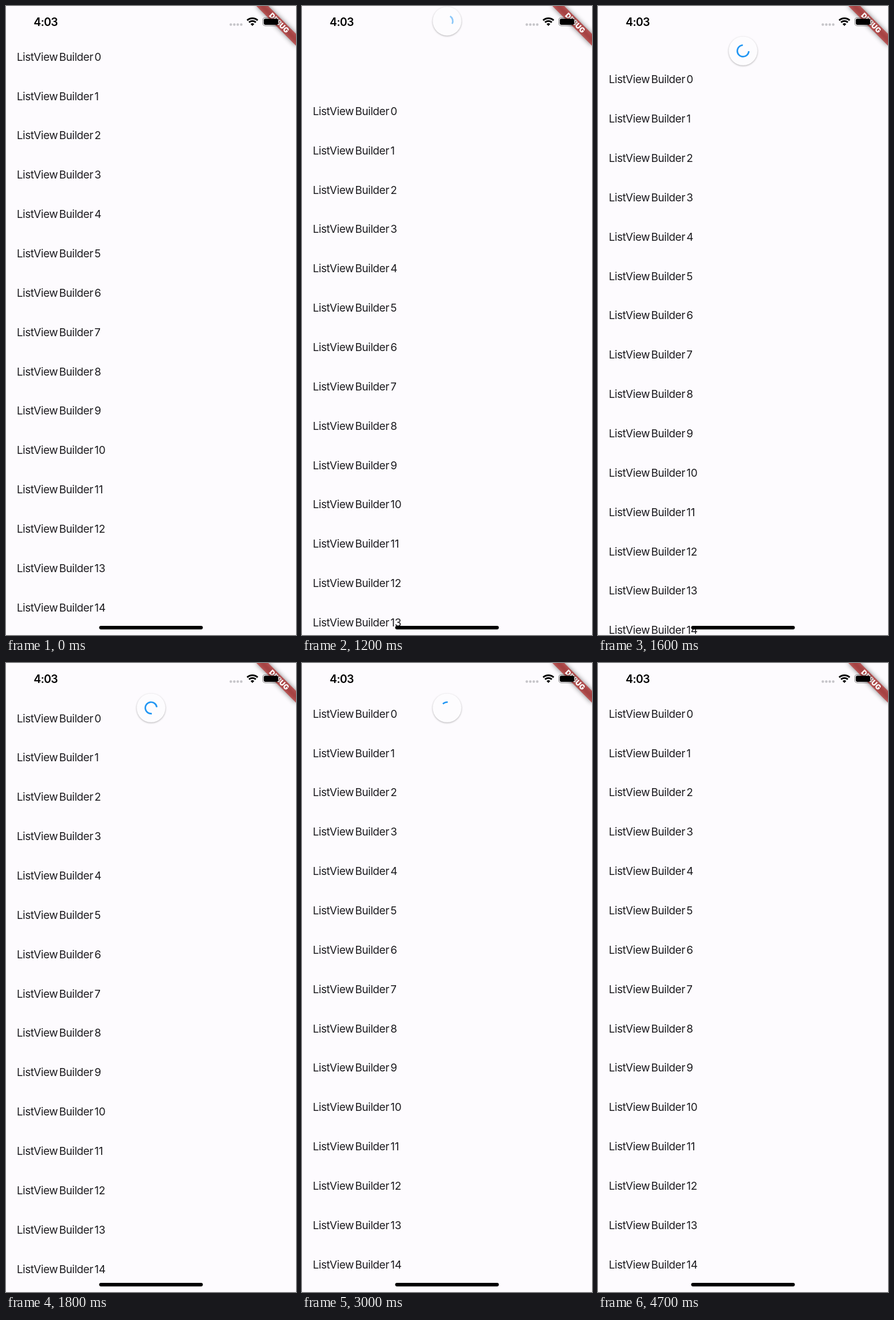
Recreate the animation shown at these times as an HTML page. Size 509 px wide and 1101 px high, loop 4800 ms.

```html
<!DOCTYPE html>
<html lang="en">
<head>
<meta charset="utf-8">
<title>Pull to refresh</title>
<style>
  html, body { margin: 0; width: 100%; height: 100%; overflow: hidden; background: #fdfbfe; }
  svg { display: block; font-family: Inter, "Liberation Sans", sans-serif; font-optical-sizing: none; }
  #list { font-size: 19px; letter-spacing: -.45px; word-spacing: -2.4px; fill: #1c1b1f; }
  #disc { fill: #fdfcfe; filter: drop-shadow(0 1px 1.6px rgba(0, 0, 0, .3)); }
  #arc { fill: none; stroke: #2196f3; stroke-width: 2.7; }
  .clock { font-size: 19.6px; font-weight: 600; letter-spacing: -.7px; text-anchor: middle; }
  .debug { font-size: 12.5px; font-weight: 900; text-anchor: middle; fill: #fff; }
</style>
</head>
<body>
<svg width="509" height="1101" viewBox="0 0 509 1101">
  <defs>
    <filter id="blur" x="-50%" y="-150%" width="200%" height="400%"><feGaussianBlur stdDeviation="4.5"/></filter>
  </defs>
  <g id="list"></g>
  <g id="spinner"><circle id="disc" r="25.2"/><path id="arc"/></g>

  <g transform="translate(509 0) rotate(45)">
    <rect x="-49.2" y="34.4" width="98.4" height="14.8" fill="#000" fill-opacity=".5" filter="url(#blur)"/>
    <rect x="-49.2" y="34.4" width="98.4" height="14.8" fill="#b71c1c" fill-opacity=".63"/>
    <text class="debug" x="0" y="46.3">DEBUG</text>
  </g>

  <text class="clock" x="69.5" y="35">4:03</text>
  <g fill="#c6c5c9">
    <circle cx="394.6" cy="32.5" r="2.2"/><circle cx="400.7" cy="32.5" r="2.2"/>
    <circle cx="406.8" cy="32.5" r="2.2"/><circle cx="412.9" cy="32.5" r="2.2"/>
  </g>
  <g fill="none" stroke="#000" stroke-width="3">
    <path d="M423.3 25.1A13.5 13.5 0 0 1 441.7 25.1M426.5 28.6A8.8 8.8 0 0 1 438.5 28.6"/>
    <path d="M432.5 35L429.2 31.5A4.8 4.8 0 0 1 435.8 31.5Z" fill="#000" stroke="none"/>
  </g>
  <rect x="450.6" y="20.5" width="29" height="14.2" rx="4.4" fill="none" stroke="#000" stroke-opacity=".4" stroke-width="1.2"/>
  <path d="M481 25.2Q483.4 27.6 481 30Z" fill-opacity=".45"/>
  <rect x="452.4" y="22.3" width="25.4" height="10.6" rx="2.8"/>
  <rect x="163.5" y="1084.9" width="182" height="6.3" rx="3.1"/>
</svg>
<script>
const LOOP = 4800, STEP = 100, ROW = 68.85;
const PULL = 1000, RELEASE = 1400, SPIN = 1600, WRAP = 2200, HIDE = 4600;
const REST_Y = 78.6, RADIUS = 10.1, CYCLE = 1333;
const $ = id => document.getElementById(id);
const clamp = x => Math.max(0, Math.min(1, x));

$('list').innerHTML = Array.from({ length: 15 }, (_, i) =>
  `<text x="19" y="${95.7 + i * ROW}">ListView Builder ${i}</text>`).join('');

// cubic-bezier(.4, 0, .2, 1)
function ease(x) {
  let lo = 0, hi = 1, s;
  for (let i = 0; i < 20; i++) {
    s = (lo + hi) / 2;
    const bx = 1.2 * (1 - s) ** 2 * s + .6 * (1 - s) * s * s + s ** 3;
    if (bx < x) lo = s; else hi = s;
  }
  return 3 * (1 - s) * s * s + s ** 3;
}

// List offset: the finger drags down, then the overscroll decays
function pull(t) {
  if (t < PULL || t >= WRAP) return 0;
  const drag = 95.2 * ((t - 960) / 240) ** 1.25;
  const settle = 39.7 * Math.exp(-.00804 * (t - 1600));
  return Math.min(drag, settle);
}

// [time, start angle, end angle] while the pull drives the arc
const poses = [[PULL, -80, -72], [1200, -58, 28], [RELEASE, -40, 225], [SPIN, 4, 267]];

function arcAngles(t) {
  if (t < SPIN) {
    const i = poses.findIndex(p => p[0] > t);
    const [a, b] = [poses[i - 1], poses[i]];
    const k = (t - a[0]) / (b[0] - a[0]);
    return [1, 2].map(j => a[j] + (b[j] - a[j]) * k);
  }
  // Each cycle the head runs ahead, then the tail catches up
  const u = (t < WRAP ? 1.45 : 1.31) * (t - WRAP);
  const cycle = Math.floor(u / CYCLE), phase = u / CYCLE - cycle;
  const turn = 113 + .2295 * u + 270 * cycle;
  const start = turn + 270 * ease(clamp(phase * 2 - 1));
  const end = turn + 283 * ease(clamp(phase * 2));
  return [start, Math.max(end, start + 13)];
}

const polar = deg => {
  const a = deg * Math.PI / 180;
  return `${(RADIUS * Math.cos(a)).toFixed(2)} ${(RADIUS * Math.sin(a)).toFixed(2)}`;
};

function draw(t) {
  const offset = pull(t);
  $('list').setAttribute('transform', `translate(0 ${offset})`);

  const visible = t >= PULL && t < HIDE + STEP;
  $('spinner').style.display = visible ? '' : 'none';
  if (!visible) return;
  const y = t <= RELEASE ? .596 * offset - 30.3 : REST_Y;
  const scale = t < HIDE ? 1 : .5;
  $('spinner').setAttribute('transform', `translate(254.6 ${y}) scale(${scale})`);

  const [start, end] = arcAngles(t);
  $('arc').setAttribute('d', `M${polar(start)}A${RADIUS} ${RADIUS} 0 ${+(end - start > 180)} 1 ${polar(end)}`);
  $('arc').style.opacity = t < RELEASE ? clamp(offset / 183) : 1;
}

(function tick() {
  const t = performance.now() % LOOP;
  draw(Math.floor(t / STEP) * STEP);
  requestAnimationFrame(tick);
})();
</script>
</body>
</html>
```
